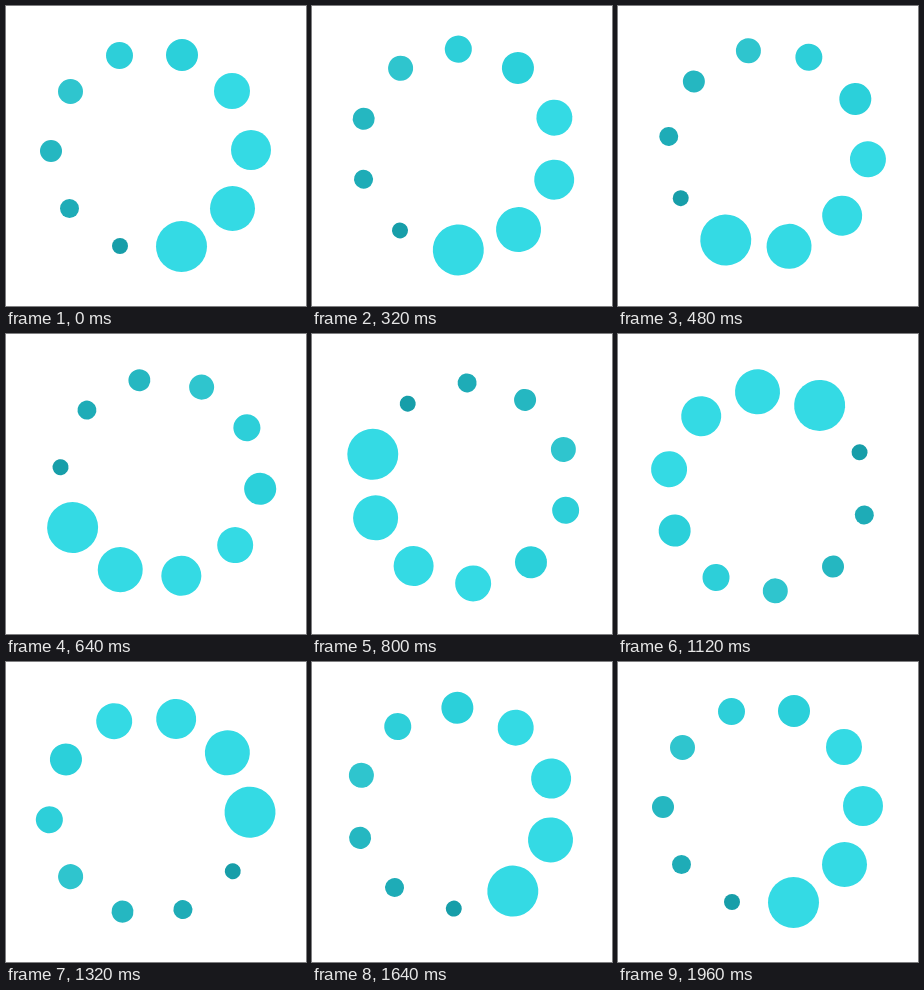
Animation of 300x300 px, one loop 2000 ms. Source, as an HTML page:

```html
<!DOCTYPE html>
<html lang="en">
<head>
<meta charset="utf-8">
<title>Loading spinner</title>
<style>
  html, body { margin: 0; width: 100%; height: 100%; overflow: hidden; background: #fff; }
  svg { display: block; width: 300px; height: 300px; }
</style>
</head>
<body>
<svg viewBox="0 0 300 300"><g id="ring"></g></svg>
<script>
const LOOP = 2000, STEP = 40, TURN = 1960;

// centre, radius and colour, from the leading dot to the last
const dots = [
  [175.5, 240.5, 25.5, '#34dae4'],
  [226.5, 202.5, 22.5, '#34dae4'],
  [245, 144, 20, '#34dae4'],
  [226, 85, 18, '#34dae4'],
  [176, 49, 16, '#2bd0da'],
  [113.5, 49.5, 13.5, '#2dcfd9'],
  [64.5, 85.5, 12.5, '#2fc5ce'],
  [45, 145, 11, '#25b7c1'],
  [63.5, 202.5, 9.5, '#1eacb7'],
  [114, 240, 8, '#179ea9']
];

const ring = document.getElementById('ring');
for (const [cx, cy, r, fill] of dots) {
  const dot = document.createElementNS('http://www.w3.org/2000/svg', 'circle');
  const attrs = { cx, cy, r, fill };
  for (const name in attrs) dot.setAttribute(name, attrs[name]);
  ring.append(dot);
}

// cubic-bezier(X1, 0, X2, 1), solved by bisection
const X1 = 0.445, X2 = 0.542;
function ease(x) {
  if (x <= 0 || x >= 1) return x <= 0 ? 0 : 1;
  let lo = 0, hi = 1;
  for (let i = 0; i < 30; i++) {
    const s = (lo + hi) / 2, q = 1 - s;
    if (3 * X1 * s * q * q + 3 * X2 * s * s * q + s * s * s < x) lo = s;
    else hi = s;
  }
  return lo * lo * (3 - 2 * lo);
}

const start = performance.now();

// The ring sits off the pivot, so it wobbles as it turns.
function draw() {
  const t = Math.max(0, performance.now() - start) % LOOP;
  const stepped = Math.floor(t / STEP) * STEP;
  ring.setAttribute('transform', `rotate(${360 * ease(stepped / TURN)} 150 150)`);
  requestAnimationFrame(draw);
}
draw();
</script>
</body>
</html>
```
